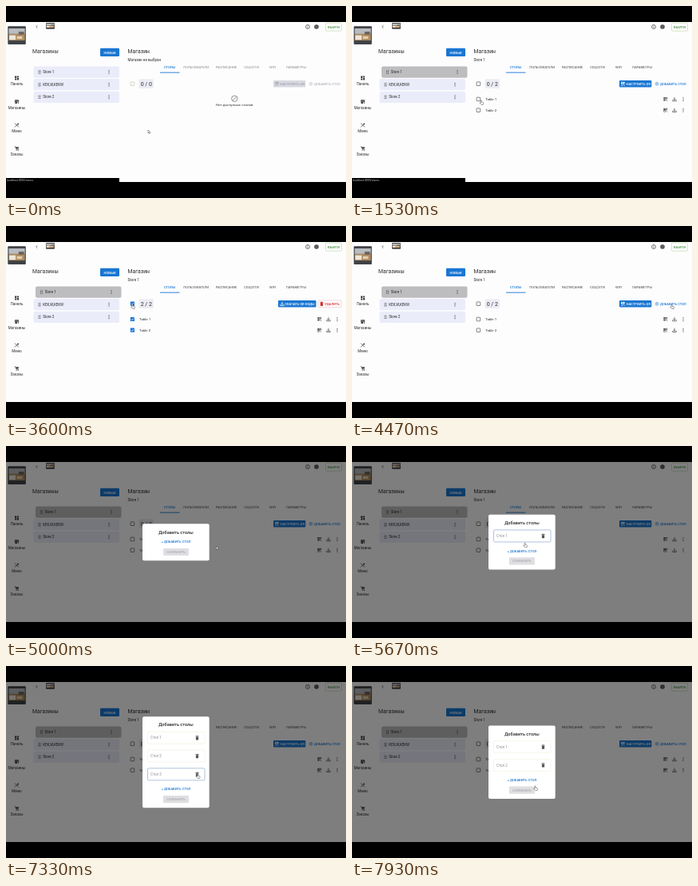
An HTML page that plays this animation: 426 by 240 pixels, repeating every 8000 ms.

```html
<!DOCTYPE html>
<html lang="ru">
<head>
<meta charset="utf-8">
<title>Магазины</title>
<style>
  html, body { margin: 0; width: 100%; height: 100%; overflow: hidden; background: #000; }
  svg { display: block; width: 100%; height: 100%; }
  text { font-family: Roboto, "Noto Sans", sans-serif; white-space: pre; }
</style>
</head>
<body>
<svg viewBox="0 0 426 240">
  <g id="scene"></g>
  <g id="dialog"></g>
  <path id="cursor" fill="#fff" stroke="#333" stroke-width=".45" stroke-linejoin="round"/>
</svg>
<script>
const LOOP = 8000;
const BLUE = '#1976d2', INK = '#2b2b2b', GREY = '#6c6c6c', PALE = '#b4b4bc', CARD = '#ebecfa', RED = '#d32f2f';

// Shape helpers; text is placed by its vertical middle.
const rect = (x, y, w, h, fill, r = 0, stroke = 'none', sw = .6) =>
  `<rect x="${x}" y="${y}" width="${w}" height="${h}" rx="${r}" fill="${fill}" stroke="${stroke}" stroke-width="${sw}"/>`;
const circle = (x, y, r, fill, stroke = 'none', sw = .7) =>
  `<circle cx="${x}" cy="${y}" r="${r}" fill="${fill}" stroke="${stroke}" stroke-width="${sw}"/>`;
const line = (d, color, sw = .7) => `<path d="${d}" fill="none" stroke="${color}" stroke-width="${sw}"/>`;
const text = (x, y, s, size, fill = INK, anchor = 'start', weight = 400) =>
  `<text x="${x}" y="${y + size * .36}" font-size="${size}" fill="${fill}" text-anchor="${anchor}" font-weight="${weight}">${s}</text>`;
const label = (x, y, s, size, fill, weight) => text(x, y, s, size, fill, 'middle', weight);

const icons = {
  dots: (x, y, c) => [-1.9, 0, 1.9].map(d => circle(x, y + d, .6, c)).join(''),
  grip: (x, y, c) => [-1.7, 0, 1.7].map(d => circle(x - .9, y + d, .6, c) + circle(x + .9, y + d, .6, c)).join(''),
  qr: (x, y, c) => [[-2.1, -2.1], [.4, -2.1], [-2.1, .4]].map(([a, b]) => rect(x + a, y + b, 1.7, 1.7, 'none', 0, c, .6)).join('') +
    rect(x + .3, y + .3, .9, .9, c) + rect(x + 1.4, y + 1.4, .9, .9, c),
  download: (x, y, c) => line(`M${x} ${y - 2.5}v3.6m-1.5-1.5l1.5 1.5l1.5-1.5M${x - 2.3} ${y + .8}v1.5h4.6v-1.5`, c),
  trash: (x, y, c) => rect(x - 1.6, y - 1.2, 3.2, 3.9, c, .4) + rect(x - 2.1, y - 2.3, 4.2, .8, c) + rect(x - .8, y - 2.7, 1.6, .6, c),
  plus: (x, y, c) => circle(x, y, 2, 'none', c, .5) + line(`M${x - 1.1} ${y}h2.2M${x} ${y - 1.1}v2.2`, c, .5),
  panel: (x, y, c) => rect(x - 2.5, y - 2.5, 2.2, 2.8, c) + rect(x + .3, y - 2.5, 2.2, 1.7, c) +
    rect(x - 2.5, y + .8, 2.2, 1.7, c) + rect(x + .3, y - .3, 2.2, 2.8, c),
  shop: (x, y, c) => rect(x - 2.4, y - 2.5, 4.8, .7, c) + rect(x - 2.7, y - 1.3, 5.4, 1.5, c) +
    rect(x - 2.2, y, 2.8, 2.5, c) + rect(x + 1.5, y, .7, 2.5, c),
  menu: (x, y, c) => line(`M${x - 2.4} ${y - 2.4}l4.8 4.8M${x - 2.4} ${y + 2.4}l4-4`, c, .8) + circle(x + 1.6, y - 1.6, 1, c),
  cart: (x, y, c) => line(`M${x - 2.8} ${y - 2.3}h1l1.3 3.4h3`, c) +
    `<path d="M${x - 1.6} ${y - 1.8}h4.3l-1 2.3h-2.5z" fill="${c}"/>` + circle(x - .4, y + 2.2, .6, c) + circle(x + 1.8, y + 2.2, .6, c),
};

function checkbox(x, y, mark, color = '#555') {
  if (!mark) return rect(x - 2.3, y - 2.3, 4.6, 4.6, 'none', .5, color, .7);
  const sign = mark === 'all' ? `M${x - 1.5} ${y}l1.1 1.2l2-2.3` : `M${x - 1.4} ${y}h2.8`;
  return rect(x - 2.6, y - 2.6, 5.2, 5.2, BLUE, .6) + line(sign, '#fff', .8);
}

function photo(x, y, w, h) {
  const part = (a, b, c, d, fill) => rect(x + w * a, y + h * b, w * c, h * d, fill);
  return rect(x, y, w, h, '#3f4246', 1) + part(.05, .12, .9, .3, '#b9bcc0') + part(.05, .42, .9, .36, '#b08d62') +
    part(.08, .5, .35, .24, '#eee6da') + part(.5, .55, .3, .14, '#e2cfae') + part(.6, .3, .3, .16, '#6b625a');
}

function chrome() {
  const nav = [['Панель', 90, 'panel'], ['Магазины', 119.5, 'shop'], ['Меню', 149, 'menu'], ['Заказы', 178, 'cart']];
  return rect(0, 20, 426, 200, '#fdfdfe') +
    photo(2.3, 25.3, 22.5, 22.8) + photo(50, 21, 11, 7.7) +
    nav.map(([name, y, icon]) => icons[icon](13.5, y, '#444') + label(13.5, y + 7.7, name, 4.5)).join('') +
    line('M39.3 24.4l-1.6 1.6l1.6 1.6', '#333') +
    circle(378, 26, 2.5, 'none', '#444') + line('M378 25.6v1.8M378 24.4v.7', '#444') +
    circle(389, 26, 2.8, '#4a4f4a') + line('M386.4 26h5.2M389 23.4v5.2', '#8a8f8a', .4) +
    rect(400.5, 21.2, 20, 10, '#fff', 1.2, '#b9d3a0') + label(410.5, 26.2, 'ВЫЙТИ', 4.2, '#43913f', 500);
}

function storeList(selected) {
  const cards = ['Store 1', 'KEK,W,KEKW', 'Store 2'].map((name, i) => {
    const on = selected && i === 0, x = on ? 37 : 34.5, y = 82.6 + i * 15.6;
    return rect(x, y - 7.1, 107.5, 14.2, on ? '#bdbdbf' : CARD, 2) +
      icons.grip(x + 7.5, y, '#555') + text(x + 11.7, y, name, 4.5) + icons.dots(x + (on ? 95 : 94.5), y, '#444');
  });
  return text(33, 57, 'Магазины', 6.8) + rect(118, 52.7, 24, 10.4, BLUE, 1.3) +
    label(130, 58, 'НОВЫЙ', 4.2, '#fff', 500) + cards.join('');
}

function toolbar({ selected, picked }) {
  if (picked) return rect(341, 93, 47.5, 8.6, BLUE, 1) + icons.download(346, 97.2, '#fff') +
    label(368, 97.3, 'СКАЧАТЬ QR-КОДЫ', 4, '#fff', 500) +
    rect(391, 93, 29, 8.6, '#fff', 1, '#eebcbc') + icons.trash(395.5, 97.3, RED) + label(408.7, 97.3, 'УДАЛИТЬ', 4, RED, 500);
  const ink = selected ? '#fff' : '#a2a2ac', link = selected ? BLUE : PALE;
  return rect(335, 93, 40.3, 8.6, selected ? BLUE : '#d9d9e2', 1) + icons.qr(339.5, 97.3, ink) +
    label(358.7, 97.3, 'НАСТРОИТЬ QR', 4.1, ink, 500) +
    icons.plus(382, 97.3, link) + label(402.3, 97.3, 'ДОБАВИТЬ СТОЛ', 4, link, 500);
}

function tables({ selected, first, second }) {
  if (!selected) return circle(286.3, 115.8, 3.7, 'none', '#777', .8) + line('M283.8 118.4l5.1-5.1', '#777', .8) +
    label(286.3, 123.8, 'Нет доступных столов', 4.4);
  return [first, second].map((on, i) => {
    const y = 116.5 + i * 13.7;
    return checkbox(158.4, y, on && 'all') + text(167, y, `Table ${i + 1}`, 4.4) +
      icons.qr(392.8, y, '#555') + icons.download(404, y, '#444') + icons.dots(415, y, '#444');
  }).join('');
}

function scene(state) {
  const { selected, picked, status } = state;
  const tabs = [['СТОЛЫ', 205], ['ПОЛЬЗОВАТЕЛИ', 238.2], ['РАСПИСАНИЕ', 276], ['СОЦСЕТИ', 307.5], ['WIFI', 334], ['ПАРАМЕТРЫ', 363.5]];
  return chrome() + storeList(selected) +
    text(152.5, 57, 'Магазин', 6.8) + text(152.5, 67, selected ? 'Store 1' : 'Магазин не выбран', 4.5) +
    tabs.map(([name, x], i) => label(x, 77, name, 4.05, i ? (selected ? GREY : '#a0a0a0') : BLUE, 500)).join('') +
    rect(193, 82.7, 24.5, .9, BLUE) +
    checkbox(158.4, 97.2, picked === 2 ? 'all' : picked ? 'some' : '', selected ? '#555' : '#c4c4b4') +
    rect(166.5, 91.2, 18.5, 11.8, '#ececf4', 1.5) + label(175.8, 97.2, `${picked} / ${selected ? 2 : 0}`, 7) +
    toolbar(state) + tables(state) +
    (status ? rect(0, 215, 142, 5, '#000') + text(1, 217.9, 'localhost:3000/stores', 3.4, '#c8c8c8') : '');
}

function dialog({ open, rows, focus }) {
  if (!open) return '';
  const height = 46 + 22.7 * rows, top = 120.2 - height / 2;
  const fields = Array.from({ length: rows }, (_, i) => {
    const y = top + 26.6 + 22.8 * i, on = focus === i + 1;
    return rect(177.5, y - 7.5, 71.5, 15, '#fff', 1.4, on ? '#7a9cc8' : '#f0eedc', .6) +
      text(181, y, `Стол ${i + 1}`, 4.5, '#8d8d96') + icons.trash(239.5, y, '#555');
  });
  return rect(0, 20, 426, 200, 'rgba(0,0,0,.5)') + rect(171, top, 83.7, height, '#fff', 2) +
    label(213, top + 10.3, 'Добавить столы', 5.6, INK, 500) + fields.join('') +
    label(213, top + 22.5 + 22.7 * rows, '+ ДОБАВИТЬ СТОЛ', 4.1, BLUE, 500) +
    rect(197, top + height - 15.3, 32, 9.2, '#dfdfe2', 1) + label(213, top + height - 10.6, 'СОХРАНИТЬ', 4.1, '#a9a9b2', 500);
}

// Each entry changes part of the state from its time on.
const events = [
  [0, { selected: false, picked: 0, first: false, second: false, status: true, open: false, rows: 0, focus: 0 }],
  [800, { selected: true }],
  [1700, { picked: 1, first: true }],
  [2000, { status: false }],
  [2350, { picked: 2, second: true }],
  [3750, { picked: 0, first: false, second: false }],
  [4600, { open: true }],
  [5500, { rows: 1, focus: 1 }],
  [6050, { rows: 2, focus: 2 }],
  [6750, { rows: 3, focus: 3 }],
  [7500, { rows: 2, focus: 0 }],
];
// Time, x, y, and whether the pointer is a hand.
const path = [
  [0, 178, 155, 0], [150, 178, 155, 0], [650, 84, 83, 1], [900, 84, 83, 1], [1450, 161.5, 118, 1], [1800, 160, 117, 1],
  [2200, 159, 131, 1], [2800, 159, 131, 1], [3400, 158, 98, 1], [3850, 158, 98, 1], [4400, 400, 98, 1], [4650, 400, 98, 1],
  [5000, 263.5, 125.5, 0], [5400, 216, 120, 1], [5600, 216, 120, 1], [5950, 217, 131, 1], [6200, 218, 131, 1], [6400, 220.5, 133, 0],
  [6650, 218, 143, 1], [6850, 218, 143, 1], [7250, 239.5, 135, 1], [7550, 239.5, 135, 1], [7900, 229, 150, 1], [8000, 229, 150, 1],
];
const ARROW = 'M0 0v4l1-.8l.7 1.4l.7-.4l-.7-1.4h1.2z';
const HAND = 'M0 .2q.6-.6 1 0v2l2.1.5q.5.2.4.8l-.5 2h-2.3l-2-2.1q.2-.7 1.3 0z';

const $ = id => document.getElementById(id);
const fade = 200, openAt = 4600;
let shown = '';

function render(now) {
  const t = now % LOOP;
  const state = Object.assign({}, ...events.filter(([at]) => at <= t).map(([, change]) => change));
  const key = JSON.stringify(state);
  if (key !== shown) {
    shown = key;
    $('scene').innerHTML = scene(state);
    $('dialog').innerHTML = dialog(state);
  }
  $('dialog').setAttribute('opacity', Math.max(0, Math.min(1, (t - openAt) / fade)));

  const next = path.findIndex(([at]) => at > t);
  const [t0, x0, y0, hand] = path[next - 1], [t1, x1, y1] = path[next];
  const p = (t - t0) / (t1 - t0), ease = p * p * (3 - 2 * p);
  $('cursor').setAttribute('d', hand ? HAND : ARROW);
  $('cursor').setAttribute('transform', `translate(${x0 + (x1 - x0) * ease} ${y0 + (y1 - y0) * ease})`);
}

const start = performance.now();
(function tick() {
  render(performance.now() - start);
  requestAnimationFrame(tick);
})();
</script>
</body>
</html>
```
